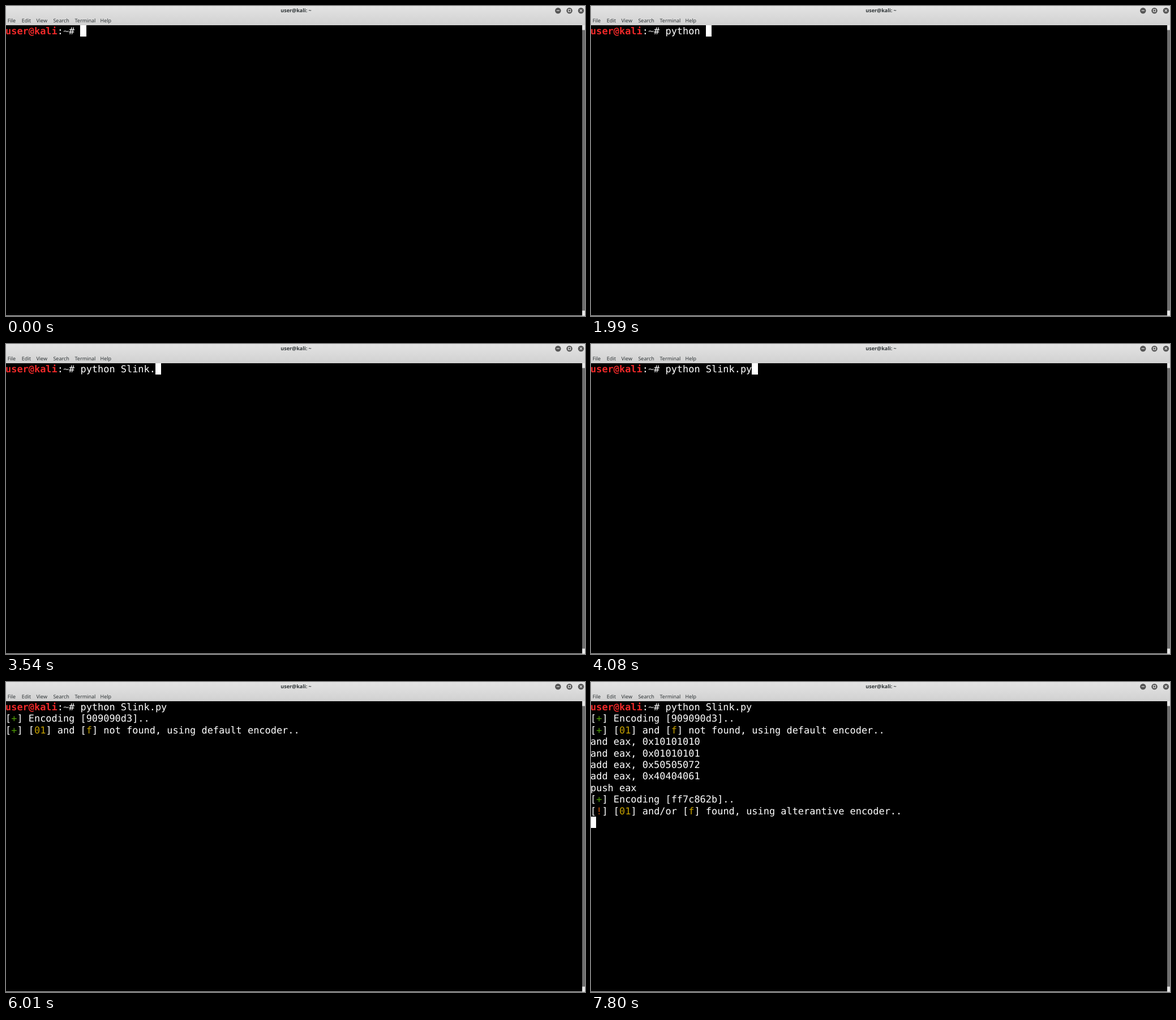
An HTML page that plays this animation: 1023 px wide and 548 px high, repeating every 8000 ms.

```html
<!DOCTYPE html>
<html lang="en">
<head>
<meta charset="utf-8">
<title>Terminal</title>
<style>
html, body { margin: 0; width: 100%; height: 100%; overflow: hidden; background: #000; }
body { position: relative; text-rendering: geometricPrecision; }
body > * { position: absolute; }
#chrome { left: 0; top: 0; }
#chrome text { font: 9px "Noto Sans", "Open Sans", sans-serif; fill: #2e3436; }
#chrome .title { font-weight: bold; text-anchor: middle; }
#screen, #cursor { left: -1px; top: 34px; }
#screen { margin: 0; color: #fff; font: 16.93px/20.4px "DejaVu Sans Mono", monospace; }
#cursor { width: 10.19px; height: 20.4px; background: #fff; }
b { color: #ef2929; }
b.path { color: #999; }
i { font-style: normal; }
.g { color: #4e9a06; }
.y { color: #c4a000; }
.r { color: #c4500a; }
</style>
</head>
<body>
<svg id="chrome" width="1023" height="548">
  <defs>
    <linearGradient id="bar" x2="0" y2="1">
      <stop stop-color="#e3e3e3"/>
      <stop offset="1" stop-color="#d1d1d1"/>
    </linearGradient>
  </defs>
  <rect width="1023" height="34" fill="url(#bar)"/>
  <text class="title" x="512.5" y="11.3">user@kali: ~</text>
  <text x="2.8" y="29.3">File</text>
  <text x="27.8" y="29.3">Edit</text>
  <text x="53.4" y="29.3">View</text>
  <text x="83.4" y="29.3">Search</text>
  <text x="121.5" y="29.3">Terminal</text>
  <text x="166.5" y="29.3">Help</text>
  <g fill="#555">
    <circle cx="975.3" cy="8.2" r="5.2"/>
    <circle cx="995.5" cy="8.2" r="5.2"/>
    <circle cx="1015.9" cy="8.2" r="5.2"/>
  </g>
  <path d="M972.7 8.2h5.2M993.5 6.2h4v4h-4zM1013.9 6.2l4 4m0-4l-4 4" fill="none" stroke="#e0e0e0" stroke-width="1.2"/>
  <rect x="1018" y="34" width="5" height="514" fill="#e6e6e6"/>
  <rect x="1018" y="42.5" width="5" height="496" fill="#6e6e6e"/>
  <rect y="547" width="1023" height="1" fill="#c8c8c8"/>
</svg>
<pre id="screen"></pre>
<div id="cursor"></div>
<script>
const LOOP = 8000, COL = 10.19, ROW = 20.4, PROMPT_COLS = 13, ENTER = 4310;
const prompt = '<b>user@kali</b>:<b class="path">~</b># ';
const command = 'python Slink.py';
const keyTimes = [920, 1150, 1300, 1530, 1610, 1840, 1990, 2310, 2390, 2620, 2930, 3080, 3540, 3850, 4080];
const hiddenCursor = [[4850, 5400], [6010, 6640], [7250, 7800]];

const tint = (name, text) => `[<i class="${name}">${text}</i>]`;
const plus = tint('g', '+'), bits = tint('y', '01'), hex = tint('y', 'f');
const output = [
  [ENTER, `${plus} Encoding [909090d3]..`],
  [5320, `${plus} ${bits} and ${hex} not found, using default encoder..`],
  [6240, 'and eax, 0x10101010'],
  [6240, 'and eax, 0x01010101'],
  [6240, 'add eax, 0x50505072'],
  [6240, 'add eax, 0x40404061'],
  [6240, 'push eax'],
  [6240, `${plus} Encoding [ff7c862b]..`],
  [7250, `${tint('r', '!')} ${bits} and/or ${hex} found, using alterantive encoder..`]
];

const screenEl = document.getElementById('screen');
const cursorEl = document.getElementById('cursor');
const start = performance.now();
let shown = '';

function draw() {
  const t = (performance.now() - start) % LOOP;
  const typed = keyTimes.filter(k => k <= t).length;
  const lines = output.filter(([at]) => at <= t).map(([, text]) => text);
  const html = [prompt + command.slice(0, typed), ...lines].join('\n');
  if (html !== shown) screenEl.innerHTML = shown = html;

  const col = t < ENTER ? PROMPT_COLS + typed : 0;
  const row = t < ENTER ? 0 : lines.length + 1;
  cursorEl.style.left = col * COL - 1 + 'px';
  cursorEl.style.top = 34 + row * ROW + 'px';
  cursorEl.hidden = hiddenCursor.some(([from, to]) => t >= from && t < to);
  requestAnimationFrame(draw);
}
draw();
</script>
</body>
</html>
```
